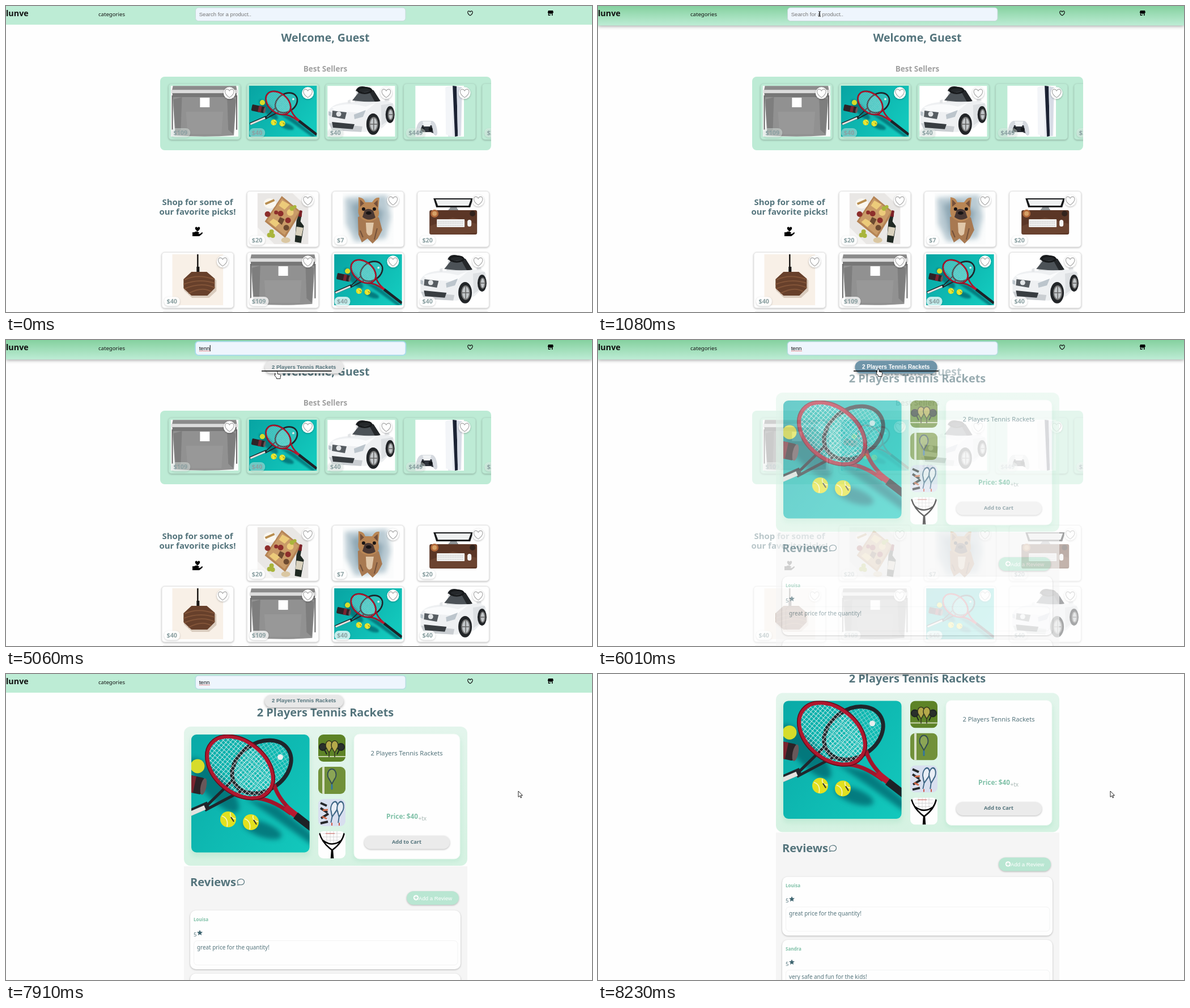
Animation, 1034 px wide and 541 px high, one loop 8300 ms. Source, as an HTML page:

```html
<!DOCTYPE html>
<html lang="en">
<head>
<meta charset="utf-8">
<title>Shop search</title>
<style>
html, body { margin: 0; height: 100%; overflow: hidden; background: #fefefe; }
svg { display: block; width: 100vw; height: 100vh; }
text { font-family: "Noto Sans", sans-serif; fill: #54747c; }
.b { font-weight: 700; }
.m { text-anchor: middle; }
.ui { font-family: "Liberation Sans", Arial, sans-serif; }
.sh { filter: drop-shadow(0 1px 1.5px #0004); }
.line { fill: none; stroke: #000; }
</style>
</head>
<body>
<svg viewBox="0 0 1034 541">
<defs>
  <linearGradient id="hover" x2="0" y2="1"><stop stop-color="#85d19f"/><stop offset="1" stop-color="#bdecd5"/></linearGradient>
  <linearGradient id="panel" x2="0" y2="1"><stop stop-color="#e3f5ec"/><stop offset="1" stop-color="#d5f2e2"/></linearGradient>
  <linearGradient id="teal" x2="1" y2=".6"><stop stop-color="#07a3a2"/><stop offset="1" stop-color="#13c9bd"/></linearGradient>
  <filter id="soft"><feGaussianBlur stdDeviation="4"/></filter>
  <pattern id="net" width="6" height="6" patternUnits="userSpaceOnUse"><path d="M0 0H6M0 0V6" stroke="#e9f3f2" stroke-width="1.6"/></pattern>
  <clipPath id="thumb"><rect width="48" height="48" rx="9"/></clipPath>
  <clipPath id="large"><rect width="208.5" height="208.5" rx="9"/></clipPath>
  <clipPath id="shelf"><rect x="272" y="125" width="584" height="130" rx="8"/></clipPath>

  <path id="heart" d="M0 8C-12 0-8.5-8-4-7.5Q-1.2-7 0-4.5Q1.2-7 4-7.5C8.5-8 12 0 0 8Z"/>
  <path id="star" d="M0-5 1.5-1.7 5-1.4 2.3 .9 3.1 4.4 0 2.5-3.1 4.4-2.3 .9-5-1.4-1.5-1.7Z" fill="#3f6570"/>

  <g id="scene">
    <rect x="-60" y="-30" width="340" height="260" fill="url(#teal)"/>
    <g fill="#06656d" opacity=".75" filter="url(#soft)">
      <ellipse cx="125" cy="168" rx="36" ry="13" transform="rotate(20 125 168)"/>
      <ellipse cx="40" cy="90" rx="62" ry="20" transform="rotate(48 40 90)"/>
      <path d="M95 112 150 125 262 214 250 222 150 150Z"/>
    </g>
    <circle cx="11" cy="56" r="12.5" fill="#d6dc2a"/>
    <g transform="rotate(12 8 88)"><rect x="-40" y="74" width="62" height="30" rx="5" fill="#2c2327"/><rect x="-8" y="74" width="14" height="30" fill="#7c2530"/><ellipse cx="22" cy="89" rx="5" ry="15" fill="#69585a"/></g>
    <path d="M92 98 24 134M72 82 22 131" stroke="#20262c" stroke-width="5"/>
    <path d="M30 124-48 158" stroke="#20262c" stroke-width="12"/>
    <path d="M24 129-46 159" stroke="#e3e2df" stroke-width="8"/>
    <g transform="translate(124 57) rotate(-34)"><ellipse rx="56" ry="42" fill="url(#net)" fill-opacity=".6" stroke="#1f252b" stroke-width="7"/></g>
    <circle cx="157" cy="40" r="5" fill="#e8eeee"/>
    <path d="M108 112Q140 112 176 140M146 88Q152 112 178 136" fill="none" stroke="#a3152b" stroke-width="7"/>
    <path d="M166 128 194 150" stroke="#b8182f" stroke-width="11"/>
    <path d="M184 143 268 208" stroke="#1d2227" stroke-width="13"/>
    <g transform="translate(86 58) rotate(40)"><ellipse rx="66" ry="45" fill="url(#net)" stroke="#b0172e" stroke-width="7"/><ellipse rx="69" ry="48" fill="none" stroke="#5d101d" stroke-width="1.5"/></g>
    <g id="ball"><circle cx="65" cy="150" r="14" fill="#e2e01f"/><path d="M54 144Q66 148 63 163M69 138Q67 147 78 149" fill="none" stroke="#f7f6c0" stroke-width="1.6"/><path d="M70 146 75 154" stroke="#333" stroke-width="2"/></g>
    <use href="#ball" x="40" y="5"/>
  </g>
  <symbol id="rackets" viewBox="-52 -23 320 240"><use href="#scene"/></symbol>

  <symbol id="cooler" viewBox="0 0 120 90">
    <rect width="120" height="90" fill="#fdfdfd"/>
    <path d="M4 0H116L118 10H2Z" fill="#8b8b8b"/><path d="M1 7H119V13H1Z" fill="#dcdcdc"/>
    <path d="M3 13H117L112 88Q60 92 8 88Z" fill="#919191"/><path d="M3 13H117L116 20H4Z" fill="#777"/>
    <path d="M5 24 20 20 18 78 9 86ZM115 24 100 20 102 78 111 86Z" fill="#7e7e7e"/>
    <path d="M27 46H93L90 86H30Z" fill="#989898"/><path d="M3 17V78M117 17V78" stroke="#696969" stroke-width="2"/>
    <rect x="52" y="21" width="17" height="17" fill="#fff"/>
  </symbol>

  <symbol id="car" viewBox="0 0 120 90">
    <rect width="120" height="90" fill="#fff"/>
    <path d="M48 29 52 8Q66 2 80 12L96 30Z" fill="#d9dbdd"/>
    <path d="M50 9Q54-2 68 2L82 8 94 27 84 31 74 14Z" fill="#25282b"/>
    <path d="M55 12 74 10 85 30 44 26Z" fill="#4c5257"/><ellipse cx="66" cy="8" rx="12" ry="5" fill="none" stroke="#17191b" stroke-width="3"/>
    <path d="M2 46Q6 32 34 29L88 28Q112 24 118 34L119 52 98 74 66 82 10 79 2 68Z" fill="#eef0f2"/>
    <path d="M8 38Q38 28 68 37L86 30 64 48 14 45Z" fill="#fafbfc"/>
    <path d="M95 34 116 31 115 56 96 70Z" fill="#dde0e3"/><path d="M3 66 62 72 60 82 8 79Z" fill="#caced2"/>
    <path d="M9 44 34 47 31 59 8 55Z" fill="#565c61"/><path d="M8 64 48 68 45 77 10 74Z" fill="#383d41"/>
    <path d="M47 51 68 43 63 55 48 59ZM2 45 7 47 6 54 2 52Z" fill="#bcc5cc"/>
    <circle cx="20" cy="50" r="4.5" fill="#e3e6e8"/>
    <g fill="#222528"><ellipse cx="81" cy="68" rx="12" ry="19"/><ellipse cx="111" cy="51" rx="8" ry="15"/></g>
    <g fill="#c3c7ca" stroke="#777" stroke-width="2"><ellipse cx="82" cy="68" rx="7" ry="12"/><ellipse cx="112" cy="51" rx="4" ry="9"/></g>
    <path d="M75 68H89M82 57V79M108 51H116" stroke="#666" stroke-width="1.5"/>
    <path d="M36 26 41 24V31H36ZM101 22 108 19 110 27 102 28Z" fill="#e4e6e8"/>
  </symbol>

  <symbol id="console" viewBox="0 0 86 90">
    <rect width="86" height="90" fill="#fff"/>
    <path d="M55 2 70 0 83 3 81 89 58 90Z" fill="#e6e9ef"/><path d="M53 3 66 0 66 90 54 86Z" fill="#f3f5f8"/>
    <path d="M66 0 73 1 75 89 70 90Z" fill="#1b2233"/><path d="M73 1 82 3 80 88 75 89Z" fill="#d7dce6"/>
    <path d="M1 84Q2 64 11 62H30Q38 65 39 84 37 93 30 82H11Q3 93 1 84Z" fill="#d5d9df"/>
    <path d="M12 70H29L32 84 27 82H13L8 84Z" fill="#30343b"/><path d="M13 63H28L26 72H15Z" fill="#f1f3f5"/>
    <circle cx="13" cy="77" r="3.5" fill="#15181c"/><circle cx="27" cy="77" r="3.5" fill="#15181c"/>
  </symbol>

  <symbol id="board" viewBox="0 0 90 90">
    <rect width="90" height="90" fill="#e9e7e5"/><path d="M0 60 30 90H0ZM62 0H90V26Z" fill="#f6f5f4"/>
    <path d="M43 5 77 33 49 79 13 50Z" fill="#b58455"/><path d="M43 9 73 33 48 74 17 49Z" fill="#c99b68"/>
    <ellipse cx="22" cy="18" rx="11" ry="9" fill="#faf7f0"/><path d="M14 19 30 12" stroke="#b88d4f" stroke-width="4"/>
    <g fill="#eccb7a"><path d="M44 13 57 20 48 29 38 22ZM28 45 40 52 32 60 21 51Z"/><circle cx="58" cy="34" r="6"/></g>
    <g fill="#8d2e2b"><circle cx="18" cy="37" r="5"/><circle cx="41" cy="36" r="5"/><circle cx="33" cy="34" r="3.5"/><circle cx="54" cy="48" r="5"/></g>
    <g fill="#6d4a30"><circle cx="51" cy="61" r="5"/><path d="M40 42 48 46 43 56 36 50Z"/></g>
    <g fill="#a9b53c"><circle cx="25" cy="68" r="4"/><circle cx="21" cy="74" r="4"/><circle cx="27" cy="75" r="4"/><circle cx="61" cy="27" r="4"/><circle cx="66" cy="24" r="3"/></g>
    <path d="M69 48 76 31 79 32 76 50 82 58 77 88 66 86Z" fill="#202923"/><path d="M69 59 81 61 78 76 67 74Z" fill="#d9d1bd"/><path d="M75 30 79 31 78 42 72 41Z" fill="#7c2026"/>
    <ellipse cx="50" cy="83" rx="8" ry="5" fill="#dac7a2"/>
  </symbol>

  <symbol id="dog" viewBox="0 0 90 90">
    <rect width="90" height="90" fill="#fbfcfc"/>
    <g filter="url(#soft)" fill="#b9cad3"><path d="M4 8 78 3 85 42 76 80 22 86 6 54Z"/><path d="M15 20 40 12 72 32 64 68 26 70Z" fill="#8fa8b5"/></g>
    <path d="M27 42Q45 33 64 43L70 65 62 80 53 89 44 80 34 87 28 73Z" fill="#a87951"/>
    <path d="M41 52H55L52 72Q46 79 42 69Z" fill="#e0c7a9"/>
    <path d="M28 25 28 7Q38 8 40 16H52Q58 6 65 8L63 28Q69 46 47 50 24 47 28 25Z" fill="#b98655"/>
    <path d="M31 11 38 18 31 24ZM62 12 55 18 62 25Z" fill="#76513b"/>
    <path d="M39 30Q46 25 54 31L58 43Q46 51 35 42Z" fill="#4b3934"/>
    <g fill="#181414"><circle cx="37" cy="28" r="3"/><circle cx="56" cy="28" r="3"/><ellipse cx="46" cy="35" rx="5" ry="3"/></g>
    <path d="M31 66 36 78M61 62 56 82" stroke="#74513a" stroke-width="2"/>
  </symbol>

  <symbol id="desk" viewBox="0 0 90 90">
    <rect width="90" height="90" fill="#fefefe"/>
    <path d="M10 9H80L75 25H15Z" fill="#17191b"/><path d="M14 11H76L72 22H18Z" fill="#eef0f0"/><path d="M40 25H51L54 30H36Z" fill="#8d9295"/>
    <rect x="3" y="30" width="84" height="43" rx="3" fill="#5b3626"/><path d="M4 58 44 43 86 54V70L60 72H4Z" fill="#6b4330"/>
    <rect x="16" y="46" width="49" height="14" rx="1" fill="#f0f0ef"/><path d="M18 50H63M18 53H63M18 57H63" stroke="#b8b8b8" stroke-width=".8" stroke-dasharray="2 1"/>
    <rect x="70" y="47" width="7" height="12" rx="3.5" fill="#f5f5f5"/><circle cx="12" cy="36" r="7" fill="#b1683a"/><circle cx="12" cy="36" r="4" fill="#d6a066"/><circle cx="79" cy="36" r="5" fill="#32231d"/>
  </symbol>

  <symbol id="charger" viewBox="0 0 90 90">
    <rect width="90" height="90" fill="#f8f0e7"/><path d="M45 0V26" stroke="#181614" stroke-width="2.5"/><rect x="43" y="22" width="5" height="9" fill="#181614"/>
    <path d="M34 34H62L78 46V65L65 77H35L21 64V46Z" fill="#d9cbbd"/><path d="M34 31H61L75 43V60L62 73H34L20 60V44Z" fill="#67402b"/>
    <path d="M22 45Q44 34 74 44M20 53Q48 42 75 51M21 61Q52 48 75 59M29 69Q53 56 69 66" fill="none" stroke="#825438" stroke-width="2"/>
  </symbol>

  <g id="racket"><ellipse rx="6" ry="8"/><path d="M-4 6 0 13 4 6M0 13V21"/></g>
</defs>

<g id="page">
  <g id="home">
    <text class="b m" x="563.5" y="63" font-size="19.5">Welcome, Guest</text>
    <text class="b m" x="563.5" y="115.5" font-size="13.5" style="fill:#a0a0a0">Best Sellers</text>
    <rect x="272" y="125" width="584" height="130" rx="8" fill="#bdebd5"/>
    <g id="best" clip-path="url(#shelf)"></g>
    <g class="b m" font-size="14.9"><text x="338" y="352">Shop for some of</text><text x="338" y="369">our favorite picks!</text></g>
    <use href="#heart" transform="translate(338 394.5) scale(.52)"/>
    <path d="M329 400H332Q336 397 340 400 343 402 338 403H342L346 400Q348 401 346 403L341 407H329Z"/>
    <g id="picks"></g>
  </g>

  <g id="product" opacity="0">
    <text class="b m" x="563.5" y="75" font-size="19.9">2 Players Tennis Rackets</text>
    <rect x="314" y="93" width="500" height="246" rx="12" fill="url(#panel)"/>
    <g fill="#b5e5cd" filter="url(#soft)" opacity=".6"><rect x="326" y="112" width="211" height="211" rx="9"/><rect x="613" y="112" width="189" height="219" rx="9"/></g>
    <g transform="translate(327 107)"><g clip-path="url(#large)"><use href="#scene"/></g></g>
    <g id="thumbs">
      <g><rect width="48" height="48" fill="#5d8327"/><path d="M0 39H48" stroke="#cbd6b0" stroke-width="2"/>
        <g fill="#2a302c" stroke="#1e2422" stroke-width="2"><circle cx="8" cy="22" r="6"/><circle cx="40" cy="22" r="6"/><path d="M11 27 15 35M37 27 33 35"/></g>
        <g fill="#b4a94a" stroke="#32351f" stroke-width="1.5"><use href="#racket" x="19" y="19"/><use href="#racket" x="29" y="19"/></g></g>
      <g><rect width="48" height="48" fill="#71913a"/><path d="M9 0V48" stroke="#d8dfc6" stroke-width="4"/><g transform="translate(24 14) scale(1.25)" fill="#8ba555" stroke="#354e52" stroke-width="1.6"><use href="#racket"/></g><path d="M24 31V40" stroke="#3276a0" stroke-width="3"/></g>
      <g><rect width="48" height="48" fill="#d8dfef"/><path d="M4 7 15 12M4 16 16 24M5 34 18 26M4 43 17 40" stroke="#25272b" stroke-width="4"/><path d="M8 20 17 19M7 31 15 35" stroke="#d36b4c" stroke-width="3"/>
        <g fill="#e9eef5" stroke="#3d6584" stroke-width="2"><use href="#racket" transform="translate(28 15) rotate(12) scale(.95 1.3)"/><use href="#racket" transform="translate(39 15) rotate(8) scale(.95 1.3)"/></g><path d="M24 42V47M37 42V47" stroke="#ce5b4a" stroke-width="2"/></g>
      <g><rect width="48" height="48" fill="#fefefe"/><path d="M8 4H40M8 10H40M12 16H37M15 0V18M21 0V22M27 0V22M33 0V18" stroke="#ccc" stroke-width=".8"/><path d="M13 4H29" stroke="#cf605a"/><path d="M2 3Q7 21 24 33L23 48M46 3Q42 21 25 33L26 48M8 16Q24 29 41 16" class="line" stroke-width="2.5"/></g>
    </g>
    <rect x="614" y="106" width="187" height="221" rx="10" fill="#fefefe" stroke="#edf8f2"/>
    <text class="m" x="707" y="144" font-size="11.2">2 Players Tennis Rackets</text>
    <text class="b" x="671" y="256" font-size="11.8" style="fill:#80c1a8">Price: $40</text>
    <text x="727.5" y="259" font-size="10" style="fill:#a9b9b5">+tx</text>
    <rect class="sh" x="632" y="286" width="151" height="23.5" rx="11.7" fill="#ebebeb"/>
    <text class="b m" x="707" y="300" font-size="9.2">Add to Cart</text>

    <rect x="314" y="340" width="500" height="300" fill="#f5f5f5"/>
    <text class="b" x="325" y="374.5" font-size="20.1">Reviews</text>
    <path d="M408.500 373Q410 371.500 409 370.500C405 361 421 360 420.500 367.500 420 373.500 414 373 411.500 372.300Q410 373.500 408.500 373Z" fill="none" stroke="#54747c" stroke-width="1.2"/>
    <rect class="sh" x="707" y="384" width="92" height="24" rx="12" fill="#b9e6d2"/>
    <circle cx="723.5" cy="395.500" r="4.700" fill="#fff"/><path d="M720.500 395.500H726.500M723.500 392.500V398.500" stroke="#b0dcc8" stroke-width="1.5"/>
    <text class="ui" x="728" y="400" font-size="9.6" style="fill:#fff">Add a Review</text>
    <g id="reviews"></g>
  </g>

  <g id="header">
    <rect width="1034" height="33" fill="#bdecd5"/>
    <rect id="glow" width="1034" height="34.5" fill="url(#hover)" style="filter:drop-shadow(0 1px 3px #0006)"/>
    <text class="b" y="18" font-size="14.3" style="fill:#111">lunve</text>
    <text x="163" y="18" font-size="9.6" style="fill:#111">categories</text>
    <rect x="334.5" y="3" width="370.500" height="23.5" rx="5" fill="#eef5fd" stroke="#c5d9d8"/>
    <rect id="focus" x="334" y="2.500" width="371.500" height="24.500" rx="5.500" fill="none" stroke="#a5dcef" stroke-width="1.500"/>
    <text id="query" class="ui" x="340.700" y="18" font-size="9.6"></text>
    <path id="typo" d="M341 19.500H360" stroke="#e0433a" stroke-width="1.2" stroke-dasharray="1.300 1"/>
    <rect id="caret" y="9" width="1" height="11"/>
    <use href="#heart" transform="translate(819 12.700) scale(.52)" fill="none" stroke="#111" stroke-width="2.300"/>
    <path d="M957 8H965L966 11.500Q965 13 964.500 12.500V17H963V13.500H960.500V17H956.800V12.500Q955.500 12 955.800 11.500Z"/>
    <path d="M958 13.500H960V15.500H958Z" fill="#bdecd5"/>
    <g id="hint">
      <g id="pill">
        <rect class="sh" x="456.500" y="37" width="139" height="22" rx="11" fill="#e8e8e8" style="filter:drop-shadow(0 2px 2px #0005)"/>
        <text class="ui b m" x="525.700" y="50.500" font-size="9.500">2 Players Tennis Rackets</text>
        <g id="hot"><rect x="456.500" y="37" width="139" height="22" rx="11" fill="#6f95a9"/><text class="ui b m" x="525.700" y="50.500" font-size="9.600" style="fill:#fff">2 Players Tennis Rackets</text></g>
      </g>
      <rect id="under" x="451" y="54" height="1.600" fill="#111"/>
    </g>
  </g>
</g>

<g id="cursor" fill="#fff" stroke="#111" stroke-width=".9">
  <path id="arrow" d="M0 0V10.500L2.500 8.300 4.200 12 5.800 11.300 4.200 7.700H7.500Z"/>
  <path id="beam" d="M-2-4.500Q0-4.500 0-3.200V3.200Q0 4.500-2 4.500M2-4.500Q0-4.500 0-3.200V3.200Q0 4.500 2 4.500" fill="none"/>
  <path id="hand" d="M-1 1A1 1 0 0 1 1 1V5L5.500 6Q7 6.500 6.700 8L6 11.500V13.500H-.5V12L-3.800 8Q-3-.0-3 6.700-2 7L-1 8Z"/>
</g>
</svg>

<script>
const LOOP = 8300;
const el = {};
document.querySelectorAll('[id]').forEach(n => el[n.id] = n);

const narrow = { board: 90, dog: 90, desk: 90, charger: 90, console: 86 };

function card(x, y, art, price, shelf) {
  const w = narrow[art] || 119.5;
  const [fill, edge, pill] = shelf ? ['#bdebd5', '#b5dfcb', '#e8f3ee99'] : ['#fefefe', '#e3e3e3', '#ffffff'];
  return `<g transform="translate(${x} ${y})">
    <rect class="sh" width="126.5" height="98.500" rx="5" fill="${fill}" stroke="${edge}"/>
    <use href="#${art}" x="${63.3 - w / 2}" y="3.500" width="${w}" height="90"/>
    <rect class="sh" x="4" y="78.500" width="${9 + 6.300 * price.length}" height="16.500" rx="8" fill="${pill}" opacity=".75"/>
    <text class="b" x="8.500" y="90.300" font-size="10.800" style="fill:#8ba0a2">${price}</text>
    <circle class="sh" cx="107.300" cy="16.300" r="10.500" fill="#fefefe"/>
    <use href="#heart" transform="translate(107.300 16.800) scale(.95)" fill="none" stroke="#a5a5a5" stroke-width="1.200"/></g>`;
}

function review(y, name, words) {
  return `<g transform="translate(0 ${y})">
    <rect class="sh" x="325" y="418" width="477" height="104" rx="10" fill="#fefefe"/>
    <text class="b" x="331" y="437" font-size="8" style="fill:#80c1a8">${name}</text>
    <text x="331" y="464" font-size="9.600">5</text><use href="#star" x="342" y="457.500"/>
    <rect x="331.500" y="471.500" width="465.500" height="43" rx="6" fill="none" stroke="#f2f3f3"/>
    <text x="337" y="487" font-size="9.900">${words}</text></g>`;
}

const best = [['cooler', '$109'], ['rackets', '$40'], ['car', '$40'], ['console', '$449'], ['board', '$20']];
const picks = [null, ['board', '$20'], ['dog', '$7'], ['desk', '$20'], ['charger', '$40'], ...best.slice(0, 3)];
el.best.innerHTML = best.map((p, i) => card(287 + i * 138.3, 137.5, ...p, true)).join('');
el.picks.innerHTML = picks.map((p, i) => p ? card(275 + i % 4 * 150.3, i < 4 ? 327.5 : 435.5, ...p) : '').join('') +
  [0, 1, 2, 3].map(i => `<rect x="${275 + i * 150.3}" y="540" width="126.5" height="98" rx="5" fill="#fefefe" stroke="#e3e3e3"/>`).join('');
el.reviews.innerHTML = review(0, 'Louisa', 'great price for the quantity!') + review(111.5, 'Sandra', 'very safe and fun for the kids!');
[...el.thumbs.children].forEach((n, i) => {
  n.setAttribute('transform', `translate(551 ${107 + i * 57})`);
  n.setAttribute('clip-path', 'url(#thumb)');
});

const ease = u => u < .5 ? 4 * u ** 3 : 1 - 4 * (1 - u) ** 3;
const ramp = (t, a, b) => Math.min(1, Math.max(0, (t - a) / (b - a)));
const set = (n, attrs) => { for (const k in attrs) n.setAttribute(k, attrs[k]); };
const show = (n, on) => n.setAttribute('visibility', on ? 'visible' : 'hidden');

// Pointer stops: start, end, and the point reached
const moves = [[140, 920, 391, 14], [4660, 5060, 478, 55], [5060, 5460, 495, 51], [6630, 7640, 904, 207]];
const keys = [2780, 3090, 3320, 3560];
const letters = [2.67, 8, 13.35, 18.7];

function pointer(t) {
  let x = 520, y = 545;
  for (const [a, b, tx, ty] of moves) {
    const k = ease(ramp(t, a, b));
    x += (tx - x) * k;
    y += (ty - y) * k;
  }
  return [x, y];
}

function render(t) {
  const typed = keys.filter(k => t >= k).length;
  const fade = ramp(t, 5540, 6320);
  const scroll = 61.5 * ease(ramp(t, 7910, 8310));
  set(el.page, { transform: `translate(0 ${-scroll})` });
  set(el.home, { opacity: 1 - fade });
  set(el.product, { opacity: fade });
  set(el.glow, { opacity: ramp(t, 600, 900) - ramp(t, 6900, 7200) });
  set(el.focus, { opacity: ramp(t, 1470, 1790) - .6 * ramp(t, 5540, 5840) });

  el.query.textContent = typed ? 'tenn'.slice(0, typed) : 'Search for a product..';
  el.query.style.fill = typed ? '#111' : '#757575';
  show(el.typo, t >= 4660);
  const last = t >= 3640 ? 3640 : typed ? keys[typed - 1] : 1470;
  show(el.caret, t >= 1470 && t < 5540 && Math.floor((t - last) / 540) % 2 === 0);
  set(el.caret, { x: 341 + (typed ? letters[typed - 1] : 0) });

  const warm = ramp(t, 5140, 5400) - ramp(t, 6790, 7000);
  const size = 1 + .045 * warm;
  set(el.hint, { display: t >= 3320 ? 'inline' : 'none' });
  set(el.pill, { transform: `translate(526 48) scale(${size}) translate(-526 -48)` });
  set(el.hot, { opacity: warm });
  set(el.under, { width: 150 * (ramp(t, 4860, 5104) - ramp(t, 6790, 7030)) });

  const [x, y] = pointer(t);
  const beam = y > 2 && y < 27 && x > 334 && x < 705;
  const hand = t > 4660 && !beam && y > 36 && y < 62 && x > 451 && x < 601;
  set(el.cursor, { transform: `translate(${x} ${y})`, display: t < 140 ? 'none' : 'inline' });
  show(el.beam, beam);
  show(el.hand, hand);
  show(el.arrow, !beam && !hand);
}

function tick(now) {
  render(now % LOOP);
  requestAnimationFrame(tick);
}
requestAnimationFrame(tick);
</script>
</body>
</html>
```
